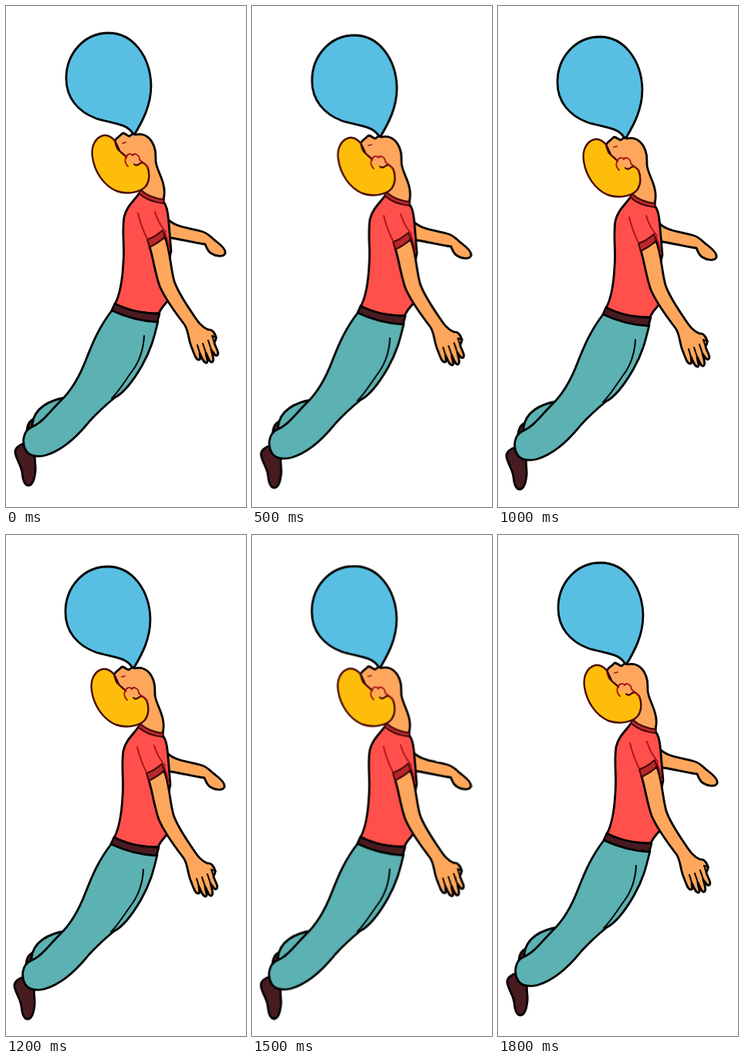
Write an HTML page that moves like this. It is 311 px wide and 650 px high and loops after 1.9 s.

```html
<!DOCTYPE html>
<html lang="en">
<head>
<meta charset="utf-8">
<title>Floating man with balloon</title>
<style>
  html, body { margin: 0; width: 100%; height: 100%; overflow: hidden; background: #fff; }
  svg { display: block; width: 311px; height: 650px; }
  path { stroke: #000; stroke-width: 2.8; stroke-linejoin: round; stroke-linecap: round; }
  .skin { fill: #fea75c; }
  .red { fill: #ff504b; }
  .teal { fill: #5cb1b2; }
  .dark { fill: #481b20; }
  .blue { fill: #58bfe3; }
  .hair { fill: #ffbd0b; stroke: #4a0c08; stroke-width: 2.4; }
  .line { fill: none; stroke-width: 2; }
  .fold { fill: none; stroke: #a51217; stroke-width: 1.8; }
  .cuff { fill: #b8272b; stroke: #3b0709; stroke-width: 2; }
</style>
</head>
<body>
<svg viewBox="0 0 311 650">
  <g id="man">
    <!-- far arm -->
    <path class="skin" d="M207 274 C219 288 236 287 252 292 C262 294 265 300 272 305 C280 311 285 317 284 321 C282 326 272 325 266 321 C261 318 260 313 258 309 C245 308 226 302 208 300 Z"/>
    <!-- far leg and shoe -->
    <path class="dark" d="M38 535 C29 537 26 546 27 560 L40 550 Z"/>
    <path class="teal" d="M78 508 C56 511 36 522 34 543 C36 553 60 538 78 508 Z"/>
    <!-- near shoe -->
    <path class="dark" d="M25 567 C17 569 11 574 12 580 C14 590 20 596 21 606 C22 616 24 622 29 622 C35 622 37 613 38 604 C39 595 36 590 38 580 Z"/>
    <!-- trousers -->
    <path class="teal" d="M138 394 C121 416 113 435 104 458 C96 479 84 500 70 513 C57 526 47 541 32 547 C22 552 20 567 26 577 C31 585 42 585 51 583 C72 577 92 559 108 539 C119 527 130 517 141 508 C153 502 165 486 176 467 C188 446 192 430 197 409 Z"/>
    <path class="line" d="M179 428 C178 448 172 462 164 473 C153 488 147 499 137 509"/>
    <!-- neck and face -->
    <path class="skin" d="M141 175 C143 170 147 170 151 165 C154 164 156 168 160 169 L164 166 L168 167 C176 165 184 168 189 176 C194 184 194 191 194 201 C195 213 204 223 205 238 C206 246 204 251 203 255 L174 242 C181 235 168 210 152 199 Z"/>
    <!-- shirt -->
    <path class="red" d="M174 241 C184 249 193 253 204 254 C209 260 210 270 211 282 L214 318 L209 340 L212 379 C208 386 202 389 198 399 C176 399 156 395 141 387 C149 372 151 353 152 333 C154 312 150 294 153 274 C156 260 166 253 174 241 Z"/>
    <path class="cuff" d="M175 239 C184 247 194 250 205 251 L204 256 C193 255 181 251 172 243 Z"/>
    <path class="dark" d="M141 386 C158 395 178 399 199 399 L196 410 C174 409 154 403 137 395 Z"/>
    <!-- near arm -->
    <path class="skin" d="M186 312 C191 328 193 346 199 363 C207 382 222 401 231 413 C237 421 236 434 241 444 C244 452 246 459 250 459 C253 459 251 453 251 450 C254 457 256 463 260 463 C263 462 259 455 259 450 C262 456 264 463 267 462 C271 460 267 451 266 446 C269 450 271 455 274 453 C277 450 271 442 270 437 L272 432 C272 425 267 419 262 420 C253 416 249 410 243 401 C233 386 223 372 218 357 C213 339 213 318 206 300 Z"/>
    <path class="line" d="M251 450 L248 440 M259 450 L255 438 M266 446 L262 434 M270 437 L267 428 L273 430"/>
    <!-- sleeve -->
    <path class="cuff" d="M183 303 C190 301 197 296 203 291 L206 299 C201 305 194 309 186 313 Z"/>
    <path class="fold" d="M171 269 C174 282 178 292 183 302 M193 267 C196 277 201 286 207 293 M206 294 C209 302 211 309 212 317"/>
    <!-- hair, ear, eye -->
    <path class="hair" d="M141 175 C137 170 132 167 126 168 C115 171 110 183 112 196 C115 216 127 233 143 240 C157 245 174 242 181 234 C187 226 186 215 183 208 C179 204 177 202 174 204 C170 208 165 207 166 202 C158 203 160 198 156 196 C153 193 149 190 145 186 C143 183 142 179 141 175 Z"/>
    <path class="skin" d="M156 197 C155 192 162 190 164 194 C166 190 173 193 173 199 C174 204 169 207 166 204 C162 207 157 202 156 197 Z" stroke="none" style="stroke:none"/>
    <path class="fold" d="M156 197 C156 192 162 190 164 194 C166 190 173 193 173 199 C175 203 179 201 183 209 M155 197 C153 202 155 205 158 208"/>
    <path class="fold" d="M151 178 L155 177"/>
    <path class="line" d="M148 168 L151 165 L158 168"/>
    <!-- balloon -->
    <path class="blue" d="M167 166 C177 149 188 129 188 103 C187 66 165 35 133 35 C101 35 78 62 78 94 C78 119 93 137 117 146 C136 152 156 152 164 165 Z"/>
  </g>
</svg>
<script>
  const LOOP = 1900;
  // start time, x shift, y shift
  const steps = [
    [0, 0, 0], [100, 0, 1], [200, -.2, 2], [500, -.3, 3],
    [800, -.4, 4], [1000, -1, 5], [1200, -1, 6], [1300, -1, 7],
    [1500, -.5, 5.5], [1600, 0, 4], [1700, 0, 2.5], [1800, 0, 1], [LOOP, 0, 0]
  ];
  document.getElementById('man').animate(
    steps.map(([t, x, y]) => ({
      offset: t / LOOP,
      transform: `translate(${x}px, ${y}px)`,
      easing: 'steps(1, end)'
    })),
    { duration: LOOP, iterations: Infinity }
  );
</script>
</body>
</html>
```
